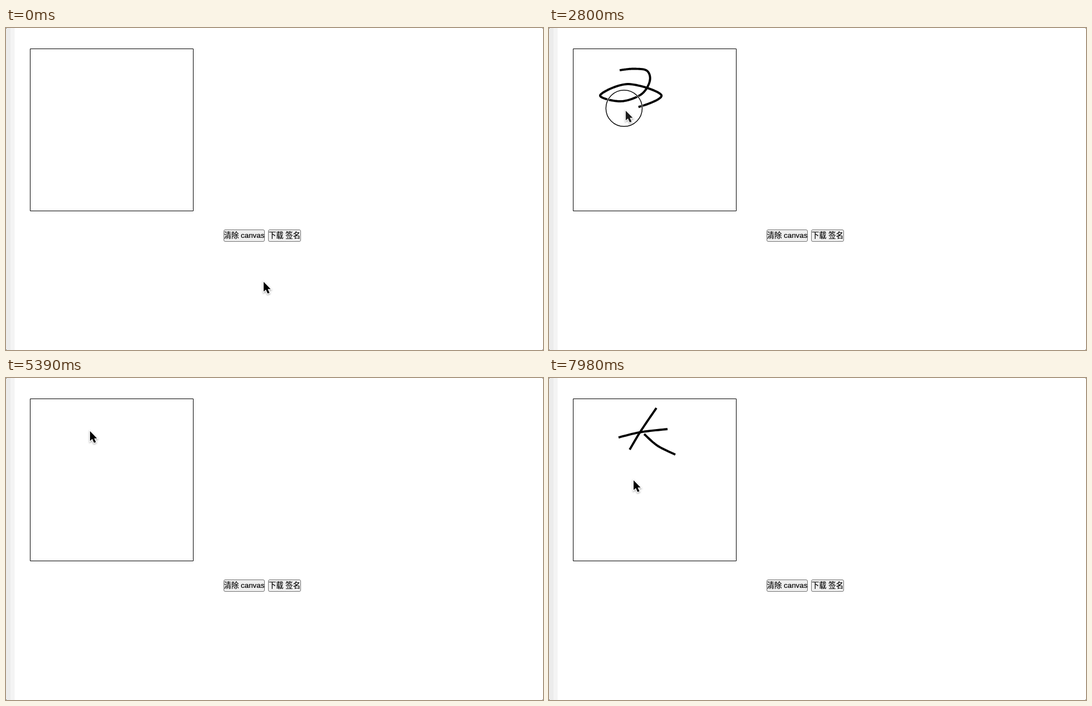
These frames come from a looping animation (965x580 px, 8000 ms). An HTML page with a canvas:

```html
<!DOCTYPE html>
<html lang="zh-CN">
<head>
<meta charset="utf-8">
<style>
  html, body { margin: 0; width: 100%; height: 100%; overflow: hidden; background: #fff; }
  canvas { position: absolute; left: 0; top: 0; }
  .btn {
    position: absolute; top: 363px; height: 22px; box-sizing: border-box;
    border: 1px solid #707070; border-radius: 3px; background: #efefef; color: #000;
    font: 13.33px/20px "Liberation Sans", "Noto Sans CJK SC", "Noto Sans CJK", sans-serif;
    -webkit-text-stroke: .2px #000;
    display: flex; justify-content: center; white-space: pre;
  }
  #clear { left: 391px; width: 74px; }
  #save { left: 471px; width: 59px; }
</style>
</head>
<body>
<div class="btn" id="clear">清除 canvas</div>
<div class="btn" id="save">下载 签名</div>
<canvas id="stage" width="965" height="580"></canvas>
<script>
const ctx = document.getElementById('stage').getContext('2d');
const LOOP = 8000, STEP = 70, INK_LAG = 50, CLEAR_AT = 4620;

const sections = [], presses = [];
let last = [460, 453];

// Pointer glides to (x, y), slowing down.
function move(t0, t1, x, y) {
  sections.push({ t0, t1, pts: [last, [x, y]], ease: p => 1 - (1 - p) ** 2 });
  last = [x, y];
}

// Pointer follows a curve through the points and leaves ink.
function stroke(t0, t1, power, ...pts) {
  sections.push({ t0, t1, pts, ink: true, ease: p => p ** power });
  last = pts[pts.length - 1];
}

const press = (from, to) => presses.push({ from, to });

move(0, 420, 165, 70);
move(490, 980, 104, 76);
move(1210, 1400, 127, 76);

// Spiral scribble: right, belly, left and top of each loop
press(1120, 3850);
stroke(1400, 3780, 1.58,
  [127, 76], [152, 73.5], [176, 77],
  [181, 96], [165, 120], [128, 132], [92, 121], [142, 101],
  [202, 121], [160, 142.5], [120, 143], [150, 134],
  [184, 148], [148, 174], [117, 177], [160, 166.5],
  [213, 194], [165, 225], [130, 227], [190, 199.5],
  [218, 214], [186, 242], [141, 243]);

// Clear button and back
move(3850, 4060, 368, 334);
move(4060, 4200, 383, 355);
move(4270, 4480, 420, 382);
press(4480, 4690);
move(4690, 5110, 172, 22);
move(5110, 5390, 148, 91.5);
move(5390, 5530, 125, 107);

// Three strokes of a character
press(5530, 6160);
stroke(5740, 6090, 1, [125, 107], [165, 97.5], [213, 92]);
move(6230, 6440, 193, 54);
press(6440, 6790);
stroke(6440, 6720, 1, [193, 54], [164, 97], [145, 129]);
move(6790, 6860, 161, 111);
move(6930, 7140, 171, 101);
press(7140, 7840);
stroke(7210, 7630, 1, [171, 101], [195, 122], [227, 138]);
move(7770, 7980, 149, 180);

const progress = (s, t) => s.ease(Math.max(0, Math.min(1, (t - s.t0) / (s.t1 - s.t0))));

// Catmull-Rom curve at u = 0..1
function pointOn(pts, u) {
  const end = pts.length - 1, i = Math.min(Math.floor(u * end), end - 1), f = u * end - i;
  const [a, b, c, d] = [-1, 0, 1, 2].map(k => pts[Math.max(0, Math.min(end, i + k))]);
  return [0, 1].map(k => {
    const m0 = (c[k] - a[k]) / 2, m1 = (d[k] - b[k]) / 2, gap = c[k] - b[k];
    return b[k] + f * (m0 + f * (3 * gap - 2 * m0 - m1 + f * (m0 + m1 - 2 * gap)));
  });
}

function pointerAt(t) {
  const s = sections.filter(s => s.t0 <= t).pop();
  const u = progress(s, t);
  if (s.ink) return pointOn(s.pts, u);
  const [a, b] = s.pts;
  return a.map((v, k) => v + (b[k] - v) * u);
}

function drawInk(t) {
  ctx.strokeStyle = '#000';
  ctx.lineWidth = 3.9;
  ctx.lineJoin = 'round';
  const done = t - INK_LAG;
  for (const s of sections) {
    if (!s.ink || s.t0 >= done || (s.t0 < CLEAR_AT && t >= CLEAR_AT)) continue;
    const u = progress(s, done), n = s.pts.length * 8;
    ctx.beginPath();
    for (let i = 0; i <= n; i++) ctx.lineTo(...pointOn(s.pts, u * i / n));
    ctx.stroke();
  }
}

function drawRing(x, y) {
  ctx.beginPath();
  ctx.arc(x, y, 32.6, 0, Math.PI * 2);
  ctx.strokeStyle = 'rgba(255,255,255,.6)';
  ctx.lineWidth = 3.6;
  ctx.stroke();
  ctx.strokeStyle = '#0c0c0c';
  ctx.lineWidth = 1.5;
  ctx.stroke();
}

const arrow = new Path2D('M0 0V17.5L4 14 7.2 21 10.6 19.6 7.4 12.9H12.6Z');

function drawPointer(x, y, pressed) {
  ctx.save();
  ctx.translate(x + 3, y + 4.3);
  ctx.shadowColor = 'rgba(0,0,0,.35)';
  ctx.shadowBlur = 3;
  ctx.shadowOffsetY = 1.5;
  ctx.lineJoin = 'miter';
  ctx.strokeStyle = '#fff';
  ctx.lineWidth = 2.6;
  ctx.stroke(arrow);
  ctx.shadowColor = 'transparent';
  ctx.fillStyle = pressed ? '#1c1c1c' : '#000';
  ctx.fill(arrow);
  ctx.restore();
}

function drawPage() {
  ctx.fillStyle = '#ececec';
  ctx.fillRect(0, 0, 8, 580);
  ctx.fillStyle = '#f4f4f4';
  ctx.fillRect(8, 0, 7.5, 580);
  ctx.strokeStyle = '#000';
  ctx.lineWidth = 1;
  ctx.strokeRect(43.5, 37.5, 293, 292);
  // Dark window corners
  ctx.fillStyle = '#555';
  for (const x of [0, 964]) for (const y of [0, 579]) ctx.fillRect(x, y, 1, 1);
}

function draw(now) {
  const t = Math.floor((now % LOOP) / STEP) * STEP;
  const [x, y] = pointerAt(t);
  const pressed = presses.some(p => t >= p.from && t < p.to);
  ctx.clearRect(0, 0, 965, 580);
  drawPage();
  drawInk(t);
  if (pressed) drawRing(x, y);
  drawPointer(x, y, pressed);
}

function tick() {
  draw(performance.now());
  requestAnimationFrame(tick);
}
tick();
</script>
</body>
</html>
```
